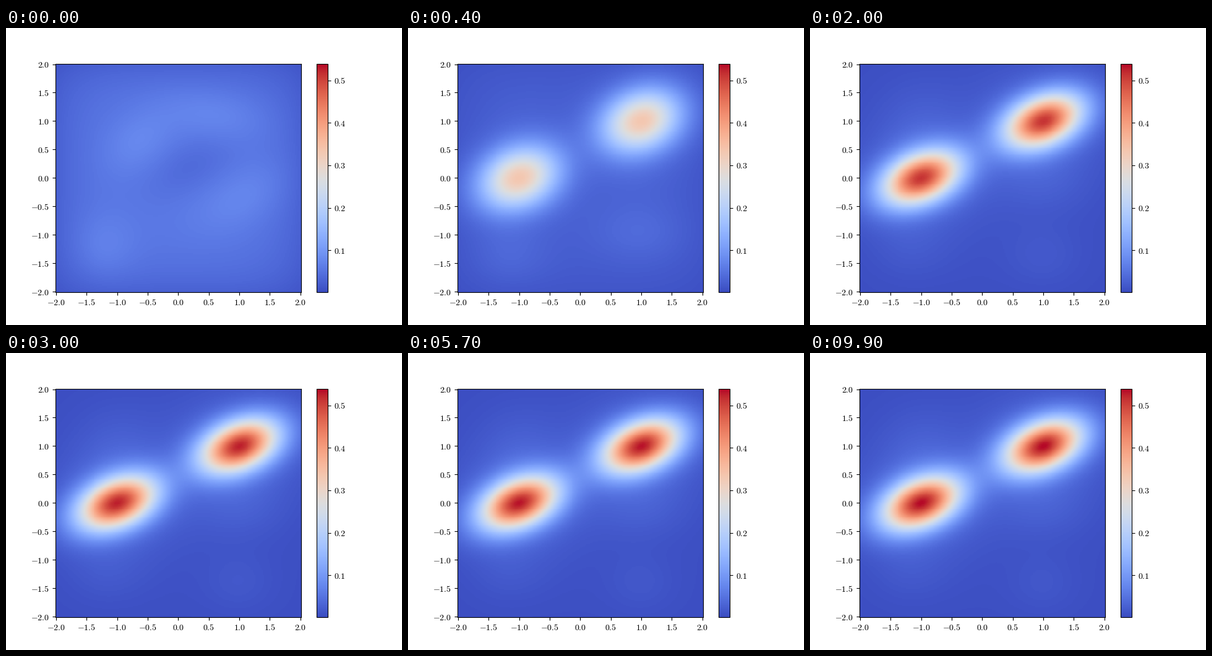
Write a matplotlib script that moves like this. It is 640 px wide and 480 px high and loops after 10 s.

```python
import numpy as np
import matplotlib.pyplot as plt
from matplotlib.animation import FuncAnimation
from matplotlib.ticker import FuncFormatter, MultipleLocator

plt.rcParams["mathtext.fontset"] = "cm"

FRAMES, INTERVAL = 100, 100
VMIN, VMAX = 0.001, 0.5393
CENTRES = [(-1, 0), (1, 1)]

# Peak height at a few steps, joined on a logarithmic clock
KEY_STEPS = [1, 4, 12, 30, 99]
KEY_PEAKS = [0.213, 0.333, 0.495, 0.526, 0.537]

axis = np.linspace(-2, 2, 200)
X, Y = np.meshgrid(axis, axis)


def bump(cx, cy, sx, sy, rho=0.0):
    """Unit-height Gaussian with correlation rho."""
    u, v = (X - cx) / sx, (Y - cy) / sy
    return np.exp(-(u * u - 2 * rho * u * v + v * v) / (2 * (1 - rho * rho)))


def mix(a, b, t):
    return a + (b - a) * t


def fade_edges(field, depth):
    edge = (1 - depth * (X / 2) ** 4) * (1 - depth * (Y / 2) ** 4)
    return np.clip(field * edge, VMIN, None)


def start_field():
    """Nearly flat plateau with soft swells around a shallow hollow."""
    swells = (bump(-0.65, 0.65, 0.4, 0.4, 0.3)
              + bump(0.55, 1.15, 0.65, 0.35, -0.3)
              + bump(1.15, -0.3, 0.6, 0.45, 0.5)
              + bump(-1.25, -1.25, 0.36, 0.42))
    hollow = bump(0.2, 0.2, 0.5, 0.38, 0.4)
    return fade_edges(0.056 + 0.022 * swells - 0.017 * hollow, 0.52)


def fitted_field(step):
    """Two peaks that grow, narrow and tilt while the rest sinks."""
    peak = np.interp(np.log(step), np.log(KEY_STEPS), KEY_PEAKS)
    fit = (peak - KEY_PEAKS[0]) / (KEY_PEAKS[-1] - KEY_PEAKS[0])

    back = mix(0.031, 0.006, fit)
    back = back + mix(0.024, 0.010, fit) * (
        bump(-1.2, mix(-1.5, -1.2, fit), 0.45, 0.38)
        + bump(1, mix(-0.7, -1.45, fit), mix(0.65, 0.4, fit), 0.38))
    back = back + 0.016 * fit * (bump(-1, 0.9, 0.5, 0.6)
                                 + bump(1, -0.05, 0.55, 0.4))
    back = fade_edges(back, mix(0.5, 0.3, fit))

    sx, sy, rho = 0.45, mix(0.42, 0.335, fit), mix(0.12, 0.37, fit)
    halo = 0.06 * fit
    peaks = sum(mix(bump(cx, cy, sx, sy, rho), bump(cx, cy, 0.75, 0.65), halo)
                for cx, cy in CENTRES)
    return back + (peak - back) * np.clip(peaks, 0, 1)


def field_at(step):
    return fitted_field(step) if step else start_field()


fig, ax = plt.subplots(figsize=(6.4, 4.8), dpi=100)
mesh = ax.pcolormesh(X, Y, field_at(0), cmap="coolwarm", vmin=VMIN, vmax=VMAX,
                     shading="nearest")
bar = fig.colorbar(mesh, ax=ax)

label = FuncFormatter(lambda v, _: f"${v + 0.0:.1f}$")
for line, gap in ((ax.xaxis, 0.5), (ax.yaxis, 0.5), (bar.ax.yaxis, 0.1)):
    line.set_major_locator(MultipleLocator(gap))
    line.set_major_formatter(label)


def draw(step):
    mesh.set_array(field_at(step))
    return (mesh,)


anim = FuncAnimation(fig, draw, frames=FRAMES, interval=INTERVAL,
                     repeat=True, repeat_delay=0, blit=False)
plt.show()
```
